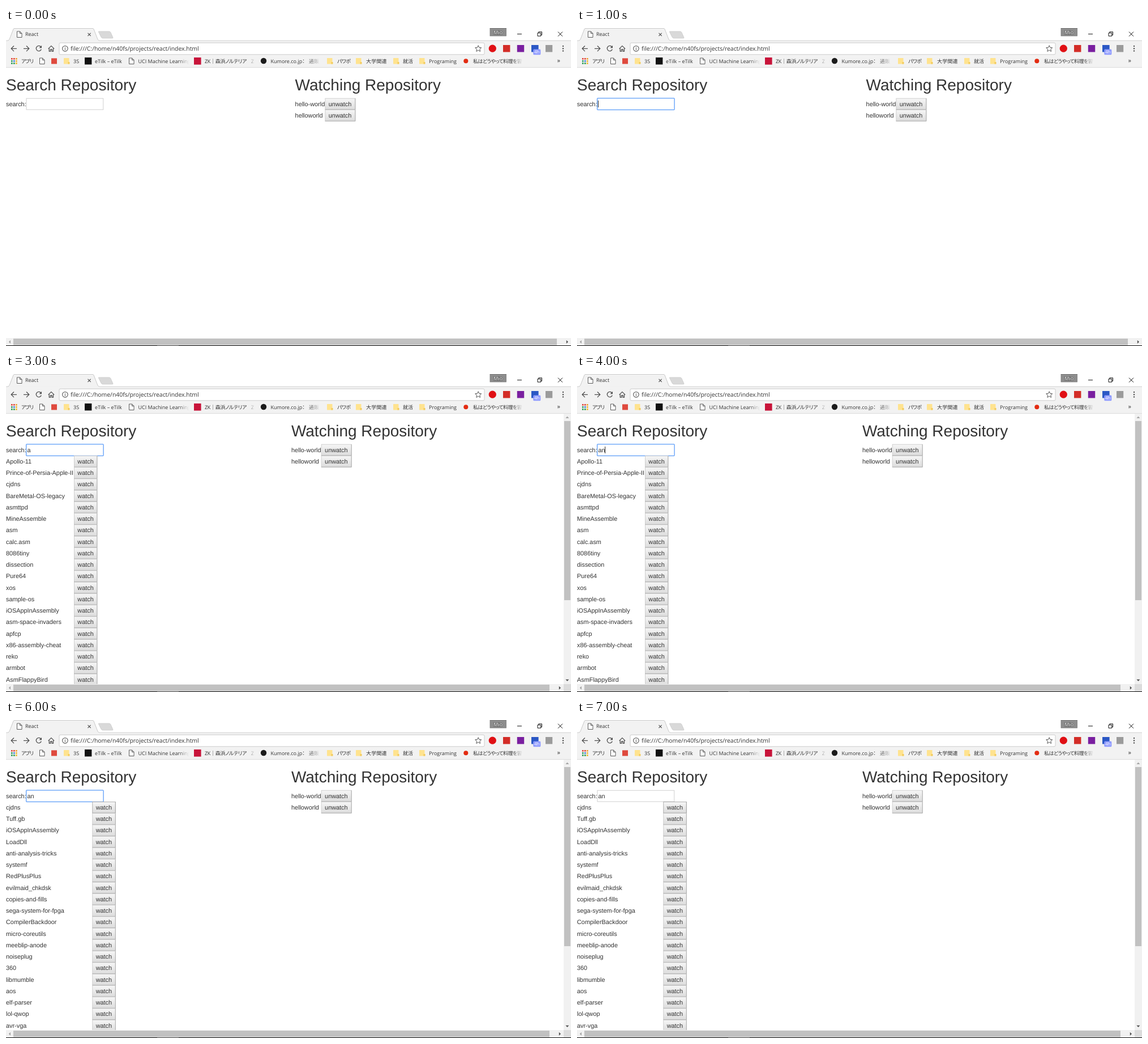
An HTML page for the animation above (8 s loop, 998 by 561 pixels).

```html
<!DOCTYPE html>
<html lang="ja">
<head>
<meta charset="utf-8">
<title>React</title>
<style>
html, body { margin: 0; width: 100%; height: 100%; overflow: hidden; background: #fff; }
svg { display: block; width: 100%; height: 100%; }
text { white-space: pre; text-rendering: geometricPrecision; }
.ui { font: 9px "Open Sans", "Noto Sans CJK JP", sans-serif; fill: #333; font-feature-settings: "palt"; }
.page { font: 10.89px "Liberation Sans", Arial, sans-serif; fill: #333; }
.h1 { font-size: 28px; }
.line { fill: none; stroke: #505050; stroke-width: 1.3; }
</style>
</head>
<body>
<svg id="stage" viewBox="0 0 998 561" preserveAspectRatio="none">
  <defs>
    <linearGradient id="face" x1="0" y1="0" x2="0" y2="1">
      <stop offset="0" stop-color="#f6f6f6"/><stop offset="1" stop-color="#dcdcdc"/>
    </linearGradient>
    <linearGradient id="fade">
      <stop offset="0" stop-color="#f2f2f2" stop-opacity="0"/><stop offset="1" stop-color="#f2f2f2"/>
    </linearGradient>
  </defs>
  <rect width="998" height="561" fill="#fff"/>
  <g id="chrome"></g>
  <g id="page" class="page"></g>
  <g id="bars"></g>
</svg>
<script>
const $ = id => document.getElementById(id);
const ROW = 20.25;

const rect = (x, y, w, h, fill, extra = '') =>
  `<rect x="${x}" y="${y}" width="${w}" height="${h}" fill="${fill}" ${extra}/>`;
const circle = (x, y, r, fill) => `<circle cx="${x}" cy="${y}" r="${r}" fill="${fill}"/>`;
const path = (d, extra = 'class="line"') => `<path d="${d}" ${extra}/>`;
const text = (x, y, s, extra = '') => `<text x="${x}" y="${y}" ${extra}>${s}</text>`;
const ui = (x, y, s, size = 9, gap = 0) =>
  text(x, y, s, `class="ui" style="font-size:${size}px;letter-spacing:${gap}px"`);
const fade = (x, w) => rect(x, 50, w, 18, 'url(#fade)') + rect(x + w, 50, 6, 18, '#f2f2f2');

const sheet = (x, y) => path(`M${x} ${y}h5l3.5 3.5v7h-8.5zM${x + 5} ${y}v3.5h3.5`,
  'fill="#fff" stroke="#5a5a5a" stroke-width="1"');
const folder = x => rect(x, 53, 9.5, 10.5, '#ffe38f', 'rx=".6"') +
  rect(x + 7.5, 60, 3, 3.5, '#f3cb5c');

function tabStrip() {
  return rect(0, 22, 998, 47.5, '#f2f2f2') +
    path('M0 22.2H4M165 22.2H998', 'stroke="#c9c9c9" stroke-width=".8"') +
    path('M3 22.6Q5 22 6 20L13 2Q14 .4 16 .4H152Q154 .4 155 2L162 20Q163 22 165 22.6Z',
      'fill="#f2f2f2"') +
    path('M3 22.2Q5 22 6 20L13 2Q14 .4 16 .4H152Q154 .4 155 2L162 20Q163 22 165 22.2',
      'fill="none" stroke="#bdbdbd" stroke-width=".8"') +
    path('M164 6H182Q184 6 185 8L189 17Q189 18 188 18H171Q169 18 168 16L163.5 7Q163 6 164 6Z',
      'fill="#d9d9d9" stroke="#c6c6c6" stroke-width=".7"') +
    sheet(19.5, 6) + ui(34, 14.4, 'React') +
    path('M144.5 8.8l5.2 5.2m0-5.2l-5.2 5.2', 'stroke="#555" stroke-width="1.1"') +
    rect(855, 0, 28.5, 14, '#8d8d8d', 'stroke="#777" stroke-width=".8"') +
    text(869.2, 10.6, 'Mio', 'class="ui" text-anchor="middle" ' +
      'style="fill:#fff;stroke:#555;stroke-width:1.4px;paint-order:stroke"') +
    path('M903 10.7h8M939 8.8h5.7v5.4h-5.7zM940.8 8.6v-1.8h5.7v5.6h-1.6M975 6.7l8 8m0-8l-8 8',
      'fill="none" stroke="#111" stroke-width="1"');
}

function toolbar() {
  return path('M19 36.3H9.5M14 31.5l-4.8 4.8 4.8 4.8M31 36.3h9.5M36 31.5l4.8 4.8-4.8 4.8') +
    path('M61.6 33.2a4.6 4.6 0 1 0 .7 4.3') + path('M63 30.8v4.4h-4.4z', 'fill="#505050"') +
    path('M74.6 36.6l5.3-5 5.3 5M76.3 36v5h2.4v-3.3h2.4v3.3h2.4v-5') +
    rect(94, 26.2, 751, 20.6, '#fff', 'rx="2" stroke="#c8c8c8" stroke-width=".9"') +
    path('M99.6 36.3a4.8 4.8 0 1 0 9.6 0a4.8 4.8 0 1 0-9.6 0M104.4 35.6v3.2M104.4 33.2v1.2',
      'fill="none" stroke="#555" stroke-width="1.1"') +
    ui(114, 39.8, 'file:///C:/home/n40fs/projects/react/index.html', 10.4) +
    path('M834.2 30.8l1.6 3.6 3.9.4-2.9 2.6.8 3.9-3.4-2-3.4 2 .8-3.9-2.9-2.6 3.9-.4z',
      'fill="none" stroke="#555" stroke-width="1"') +
    circle(859.3, 36.2, 6.6, '#e00f14') +
    rect(878, 30, 12.4, 12.4, '#d32d27') +
    rect(902.8, 30, 12.4, 12.4, '#7a1fa0') +
    rect(928, 30, 12.6, 12.4, '#2b57c5') +
    rect(931.3, 37.6, 13, 9.6, '#8f9bff', 'rx="1.5"') +
    text(937.8, 45.3, '4h', 'class="ui" text-anchor="middle" style="font-size:8px;fill:#fff"') +
    rect(953, 30, 12.2, 12.4, '#9b9b9b') +
    [32, 36.2, 40.4].map(y => circle(984, y, 1.2, '#505050')).join('');
}

function bookmarks() {
  const dots = ['#e0443a', '#e0443a', '#f0a030', '#2f9e57', '#3f7de0', '#f2b92c',
    '#2f9e57', '#2f9e57', '#f2b92c'];
  const y = 61.6;
  return dots.map((c, i) => rect(9 + i % 3 * 4, 53 + (i / 3 | 0) * 4, 2.7, 2.7, c)).join('') +
    ui(27, y, 'アプリ', 9, -1) +
    sheet(59.5, 53) +
    rect(80, 53.4, 10, 10, '#df4a3e') +
    folder(102) + ui(119, y, '3S') +
    rect(139, 52, 12.4, 12.4, '#111') + ui(157, y, 'eTilk – eTilk') +
    sheet(217.5, 53) + ui(233.5, y, 'UCI Machine Learning') + fade(306, 17) +
    rect(332, 52, 12.6, 12.6, '#c8143a') + ui(351, y, 'ZK｜森浜ノルテリア', 9, -.3) +
    ui(433, y, 'Z') + fade(426, 14) +
    circle(455, 58, 5.2, '#1c1c1c') + ui(467.5, y, 'Kumore.co.jp：') +
    ui(535, y, '通販') + fade(530, 26) +
    folder(567) + ui(585, y, 'パワポ', 9, -.6) +
    folder(618) + ui(636, y, '大学関連', 9, .2) +
    folder(684) + ui(701, y, '就活') +
    folder(730) + ui(747, y, 'Programing') +
    circle(812.3, 58.2, 4, '#e32c12') +
    ui(825, y, '私はどうやって料理を習', 9, -.6) + fade(894, 19) +
    ui(973.5, 61.4, '»', 11) +
    path('M0 69.6H998', 'stroke="#d2d2d2" stroke-width=".8"');
}

const baseline = i => 137.5 + ROW * i;

function button(x, row, label, hot) {
  const y = 124.2 + ROW * row, w = label === 'watch' ? 40.5 : 53;
  const edge = hot ? '#a0a0a0' : '#c6c6c6';
  return rect(x + .4, y, w, 19.7, 'url(#face)', `stroke="${edge}" stroke-width=".8"`) +
    path(`M${x} ${y + 19.7}h${w + .4}v-19.7`, 'fill="none" stroke="#a6a6a6" stroke-width=".8"') +
    text(x + 6.3, baseline(row), label);
}

const lists = {
  a: { x: 120, names: `Apollo-11 Prince-of-Persia-Apple-II cjdns BareMetal-OS-legacy asmttpd
    MineAssemble asm calc.asm 8086tiny dissection Pure64 xos sample-os iOSAppInAssembly
    asm-space-invaders apfcp x86-assembly-cheat reko armbot AsmFlappyBird`.split(/\s+/) },
  an: { x: 152.4, names: `cjdns Tuff.gb iOSAppInAssembly LoadDll anti-analysis-tricks systemf
    RedPlusPlus evilmaid_chkdsk copies-and-fills sega-system-for-fpga CompilerBackdoor
    micro-coreutils meeblip-anode noiseplug 360 libmumble aos elf-parser lol-qwop
    avr-vga`.split(/\s+/) }
};

function results(key, hot) {
  const list = lists[key];
  if (!list) return '';
  return list.names.map((name, i) => text(0, baseline(i + 1), name) +
    button(list.x, i + 1, 'watch', hot && i === 0)).join('');
}

function field(s) {
  const box = s.focus
    ? rect(35.7, 123.9, 136.4, 20.4, '#fff', 'rx="1" stroke="#5b9cf8" stroke-width="1.3"')
    : rect(36, 124.2, 135.8, 19.8, '#fff', 'stroke="#c9c9c9" stroke-width=".9"');
  const caretX = 37.4 + s.typed.length * 6.06;
  return text(0, baseline(0), 'search:') + box + text(37.4, baseline(0), s.typed) +
    (s.caret ? rect(caretX - .3, 128, .9, 12, '#111') : '');
}

function watching(x) {
  return text(x, 110.4, 'Watching Repository', 'class="h1"') +
    ['hello-world', 'helloworld'].map((name, i) => text(x, baseline(i), name) +
      button(x + 52.9, i, 'unwatch')).join('');
}

function scrollbars(tall) {
  const end = tall ? 985 : 998;
  const tri = (d, c) => path(d, `fill="${c}"`);
  let out = rect(0, 547, end, 13, '#f1f1f1') +
    rect(13, 548, end - 38, 11.5, '#c1c1c1') +
    tri('M8 550.8v6l-3.2-3z', '#a3a3a3') +
    tri(`M${end - 8.2} 550.8v6l3.2-3z`, '#505050');
  if (tall) {
    out += rect(985, 70, 13, 477, '#f1f1f1') + rect(986, 83, 11, 316, '#c1c1c1') +
      tri('M988.4 78h6l-3-3.2z', '#a3a3a3') + tri('M988.4 538.8h6l-3 3.2z', '#505050') +
      rect(985, 547, 13, 13, '#dcdcdc');
  }
  return out + rect(0, 560, 998, 1, '#0c0c0c') + rect(267, 560, 38, 1, '#4a4a4a');
}

const steps = [
  { typed: '' },
  { typed: '', focus: 1, caret: 1 },
  { typed: 'a', focus: 1, caret: 1 },
  { typed: 'a', focus: 1, list: 'a' },
  { typed: 'an', focus: 1, caret: 1, list: 'a' },
  { typed: 'an', focus: 1, caret: 1, list: 'an' },
  { typed: 'an', focus: 1, list: 'an', hot: 1 },
  { typed: 'an', list: 'an', hot: 1 }
];

let shown = -1;
function draw(ms) {
  const i = Math.floor(ms / 1000) % steps.length;
  if (i === shown) return;
  shown = i;
  const s = steps[i];
  $('page').innerHTML = text(0, 110.4, 'Search Repository', 'class="h1"') + field(s) +
    results(s.list, s.hot) + watching(s.list ? 503.9 : 510.6);
  $('bars').innerHTML = scrollbars(s.list);
}

$('chrome').innerHTML = tabStrip() + toolbar() + bookmarks();
const start = performance.now();
function tick() {
  draw(performance.now() - start);
  requestAnimationFrame(tick);
}
tick();
</script>
</body>
</html>
```
